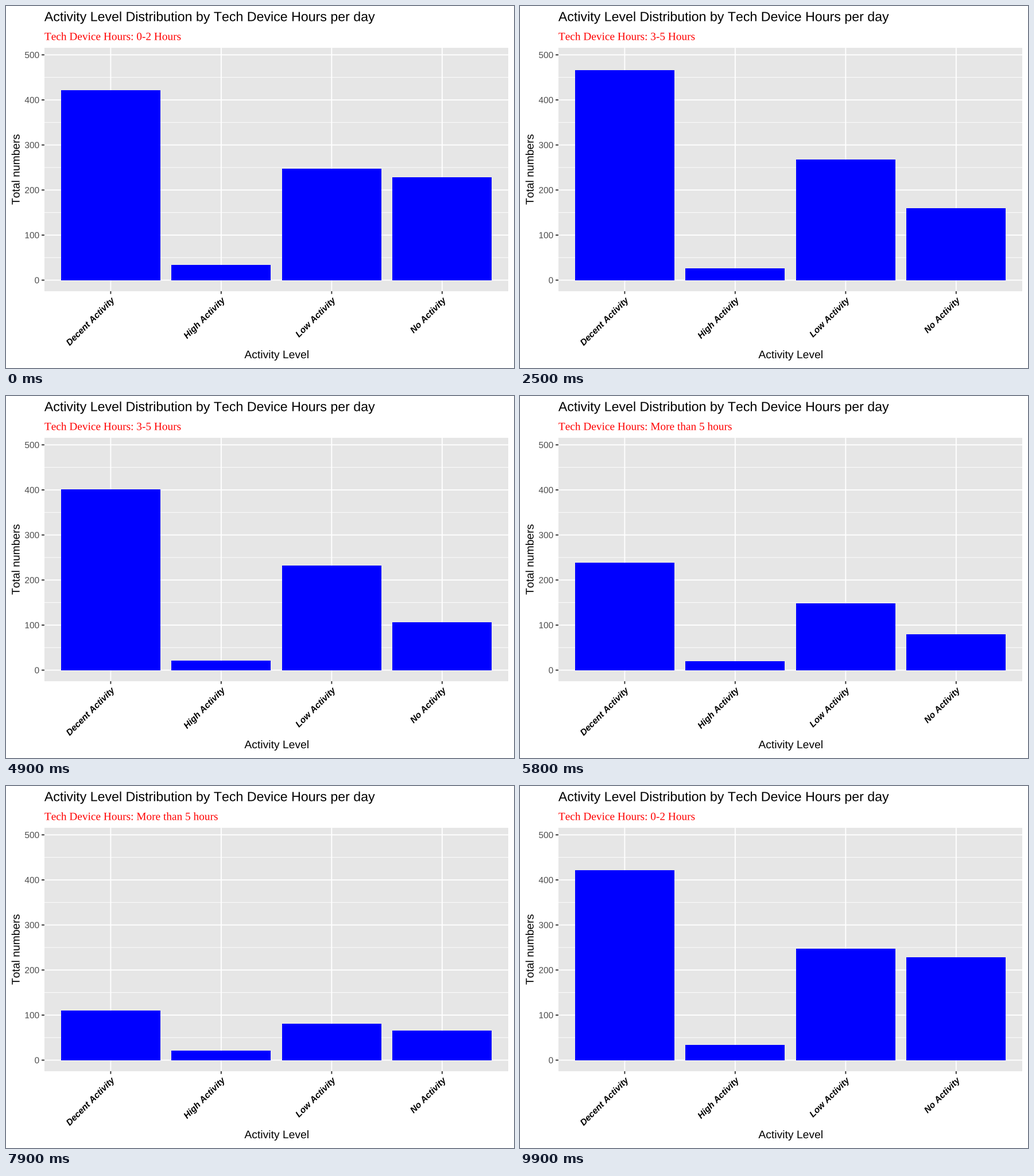
A matplotlib script for the animation above (10 s loop, 885 by 632 pixels).

```python
import matplotlib.pyplot as plt
import numpy as np
from matplotlib.animation import FuncAnimation
from matplotlib.patches import PathPatch, Rectangle
from matplotlib.textpath import TextPath
from matplotlib.transforms import Affine2D

plt.rcParams["text.kerning_factor"] = 6  # plain advances, no kerning
plt.rcParams["toolbar"] = "None"

W, H, DPI = 885, 632, 100
PT = W / 7 / 72  # pixels per typographic point
LEFT, RIGHT, TOP, BOTTOM = 66.9, 875.3, 73.1, 497.9
ZERO, SCALE = 478.6, 0.7866
UNIT = (RIGHT - LEFT) / 4.2
CENTERS = LEFT + UNIT * (0.6 + np.arange(4))
BAR_W = 0.9 * UNIT
TICK = 2.75 * PT

LEVELS = ["Decent Activity", "High Activity", "Low Activity", "No Activity"]
GROUPS = ["0-2 Hours", "3-5 Hours", "More than 5 hours"]
COUNTS = np.array([[422, 34, 248, 228],
                   [491, 21, 280, 120],
                   [94, 20, 72, 57]], dtype=float)

# last still frame, start and end of each linear move to the next group
MOVES = [(11, 11, 33), (45, 44, 66), (78, 78, 99)]
SWITCH = 12  # step of a move at which the subtitle changes

fig = plt.figure(figsize=(W / DPI, H / DPI), dpi=DPI, facecolor="white")
ax = fig.add_axes([0, 0, 1, 1])
ax.set_xlim(0, W)
ax.set_ylim(H, 0)
ax.axis("off")


def line(x0, y0, x1, y1, color, width):
    ax.plot([x0, x1], [y0, y1], color=color, lw=width * 72 / DPI,
            solid_capstyle="butt", snap=False)


def label(s, x, y, points, ha="left", angle=0, color="black",
          family="Liberation Sans", style="normal", weight="normal"):
    """Put text with its ink edge or middle at x and its baseline at y."""
    font = dict(family=family, style=style, weight=weight)
    path = TextPath((0, 0), s, size=points * PT, prop=font)
    box = path.get_extents()
    anchor = {"left": box.x0, "center": (box.x0 + box.x1) / 2,
              "right": box.x1}[ha]
    place = (Affine2D().translate(-anchor, 0).rotate_deg(angle)
             .scale(1, -1).translate(x, y))
    patch = PathPatch(path, facecolor=color, lw=0, snap=False,
                      transform=place + ax.transData)
    return ax.add_patch(patch)


def y_of(value):
    return ZERO - value * SCALE


# panel and grid
ax.add_patch(Rectangle((LEFT, TOP), RIGHT - LEFT, BOTTOM - TOP,
                       facecolor="#e6e6e6", lw=0, snap=True, zorder=0))
for v in range(50, 500, 100):
    line(LEFT, y_of(v), RIGHT, y_of(v), "white", 0.95)
for v in range(0, 501, 100):
    y = y_of(v)
    line(LEFT, y, RIGHT, y, "white", 1.9)
    line(LEFT - TICK, y, LEFT, y, "#333333", 1.9)
    label(str(v), LEFT - TICK - 4.5, y + 5.5, 8.8, "right", color="#4d4d4d")
for cx, name in zip(CENTERS, LEVELS):
    line(cx, TOP, cx, BOTTOM, "white", 1.9)
    line(cx, BOTTOM, cx, BOTTOM + TICK, "#333333", 1.9)
    label(name, cx + 7.9, 514.4, 8.8, "right", 45,
          style="italic", weight="bold")

# titles
label("Activity Level Distribution by Tech Device Hours per day",
      LEFT, 26.4, 13.2)
label("Activity Level", (LEFT + RIGHT) / 2, 615, 11, "center")
label("Total numbers", 23.6, (TOP + BOTTOM) / 2, 11, "center", 90)
subtitles = [label("Tech Device Hours: " + g, LEFT + 0.4, 59.4, 11,
                   color="red", family="Liberation Serif") for g in GROUPS]

bars = [ax.add_patch(Rectangle((cx - BAR_W / 2, ZERO), BAR_W, 0,
                               facecolor="blue", lw=0, snap=True, zorder=3))
        for cx in CENTERS]


def state(frame):
    """Bar values and the index of the named group."""
    for i, (still, start, end) in enumerate(MOVES):
        nxt = (i + 1) % len(COUNTS)
        if frame <= still:
            return COUNTS[i], i
        if frame < end:
            t = (frame - start) / (end - start)
            values = COUNTS[i] + (COUNTS[nxt] - COUNTS[i]) * t
            return values, nxt if frame - start >= SWITCH else i
    return COUNTS[0], 0


def update(frame):
    values, group = state(frame)
    for bar, v in zip(bars, values):
        bar.set_height(-v * SCALE)
    for i, sub in enumerate(subtitles):
        sub.set_visible(i == group)
    return bars + subtitles


anim = FuncAnimation(fig, update, frames=100, interval=100,
                     init_func=lambda: update(0), repeat=True,
                     repeat_delay=0, blit=False)
plt.show()
```
